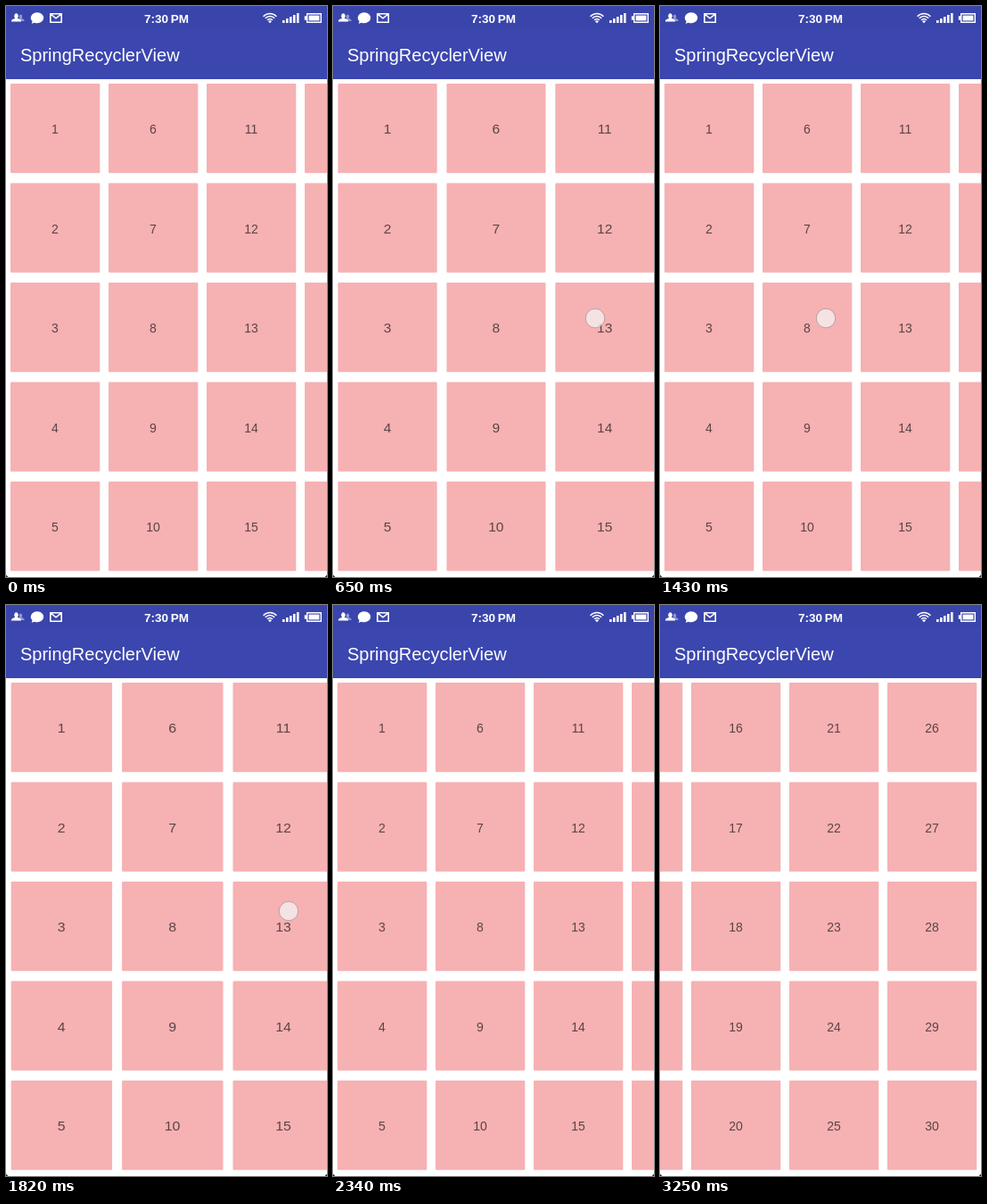
Animation, 360 px wide and 640 px high, one loop 3380 ms. Source, as an HTML page with a canvas:

```html
<!DOCTYPE html>
<html lang="en">
<head>
<meta charset="utf-8">
<title>SpringRecyclerView</title>
<style>
html, body { margin: 0; width: 100%; height: 100%; overflow: hidden; background: #fff; }
canvas { display: block; }
</style>
</head>
<body>
<canvas id="stage" width="360" height="640"></canvas>
<script>
const ctx = document.getElementById('stage').getContext('2d');
const W = 360, H = 640, LOOP = 3380, STEP = 130;
const BLUE = '#3b46af', PINK = '#f6b1b3';
const FONT = '"Liberation Sans", Arial, sans-serif';

// Tracks of [time, value]; stretch is in thousandths of the width.
const PULL = [[130, 0], [390, 72], [650, 108], [910, 123], [1040, 122], [1170, 50], [1300, 6], [1430, 0],
  [1560, 60], [1690, 112], [1820, 131], [1950, 85], [2080, 25], [2210, 4], [2340, 0]];
const SCROLL = [[2340, 0], [2470, 70], [2600, 220], [2700, 300]];
const BOUNCE = [[2680, 0], [2730, 6], [2860, 26], [2990, 14], [3120, 4], [3250, 0]];
const DRAGS = [
  { from: 130, to: 1000, x: t => 186 + track(PULL, t), y: t => 357 - t / 93 },
  { from: 1430, to: 1900, x: t => 186 + track(PULL, t), y: t => 350 - (t - 1430) / 56 },
  { from: 2400, to: 2650, x: t => 290 - track(SCROLL, t), y: () => 348 },
];

function track(keys, t) {
  if (t <= keys[0][0]) return keys[0][1];
  for (let i = 1; i < keys.length; i++) {
    const [t0, a] = keys[i - 1], [t1, b] = keys[i];
    if (t < t1) return a + (b - a) * (t - t0) / (t1 - t0);
  }
  return keys[keys.length - 1][1];
}

function rect(x, y, w, h, color) {
  ctx.fillStyle = color;
  ctx.fillRect(x, y, w, h);
}

function text(str, x, y, font, color, align = 'center') {
  ctx.font = `${font} ${FONT}`;
  ctx.fillStyle = color;
  ctx.textAlign = align;
  ctx.fillText(str, x, y);
}

function fillPath(d, color) {
  ctx.fillStyle = color;
  ctx.fill(new Path2D(d));
}

function strokePath(d, color, width) {
  ctx.strokeStyle = color;
  ctx.lineWidth = width;
  ctx.stroke(new Path2D(d));
}

function drawGrid(t) {
  const scroll = track(SCROLL, t);
  const anchor = scroll > 0 ? W : 0;
  const scale = 1 + track(anchor ? BOUNCE : PULL, t) / 1000;
  ctx.save();
  ctx.translate(anchor, 0);
  ctx.scale(scale, 1);
  ctx.translate(-anchor - scroll, 0);
  for (let i = 0; i < 30; i++) {
    const x = 5 + 110 * Math.floor(i / 5), y = 87 + 111.5 * (i % 5);
    ctx.fillStyle = PINK;
    ctx.beginPath();
    ctx.roundRect(x, y, 100.3, 100.3, 1);
    ctx.fill();
    text(i + 1, x + 50, y + 56, '14px', '#5c4444');
  }
  ctx.restore();
}

function drawStatusIcons() {
  const person = 'a2.5 3 0 0 1 1.3 5.4l3.4 1.6q.8.5.8 2.3h-11q0-1.8.8-2.3l3.4-1.6a2.5 3 0 0 1 1.3-5.4';
  ctx.save();
  ctx.translate(16.5, 9.5);
  ctx.scale(0.75, 0.8);
  fillPath('M0 0' + person, '#8f97d3');
  ctx.restore();
  fillPath('M11.5 8.3' + person, '#fff');
  fillPath('M35 7.2a7.3 6 0 1 1-3 11.5l-3.3 1 .9-2.6a7.3 6 0 0 1 5.4-9.9', '#fff');
  strokePath('M49.8 8.8h12.4v9.4h-12.4zl6.2 5 6.2-5', '#fff', 1.6);

  for (const r of [4, 7, 10]) {
    const d = r * 0.74, y = 18.5 - r * 0.68;
    strokePath(`M${296 - d} ${y}A${r} ${r} 0 0 1 ${296 + d} ${y}`, '#fff', 1.6);
  }
  fillPath('M293.9 17l2.1 2.3 2.1-2.3q-2.1-1.6-4.2 0', '#fff');
  for (let i = 0; i < 5; i++) rect(310 + i * 4, 16 - i * 2, 2.6, 3 + i * 2, '#fff');
  strokePath('M337.7 8.7h15.6v9.6h-15.6z', '#fff', 1.4);
  rect(339.6, 10.6, 11.8, 5.8, '#fff');
  rect(334.8, 11.3, 2.2, 4.4, '#fff');
}

function drawHeader() {
  rect(0, 0, W, 82, BLUE);
  rect(0, 0, W, 26, '#3a45ab');
  drawStatusIcons();
  text('7:30\u2009PM', 180, 18.5, 'bold 13.5px', '#fff');
  text('SpringRecyclerView', 16, 62, '20px', '#fff', 'left');
}

function drawTouch(t) {
  const drag = DRAGS.find(d => t >= d.from && t < d.to);
  if (!drag) return;
  ctx.beginPath();
  ctx.arc(drag.x(t), drag.y(t), 10.7, 0, Math.PI * 2);
  ctx.fillStyle = 'rgba(245, 240, 240, 0.8)';
  ctx.fill();
  ctx.strokeStyle = 'rgba(160, 135, 135, 0.65)';
  ctx.lineWidth = 1;
  ctx.stroke();
}

function draw(now) {
  const t = Math.floor(now % LOOP / STEP) * STEP;
  rect(0, 0, W, H, '#fff');
  drawGrid(t);
  drawHeader();
  drawTouch(t);
  fillPath('M0 637.5v2.5h2.5zM360 637.5v2.5h-2.5z', '#333');
}

let start;
function frame(now) {
  start ??= now;
  draw(now - start);
  requestAnimationFrame(frame);
}
requestAnimationFrame(frame);
</script>
</body>
</html>
```
